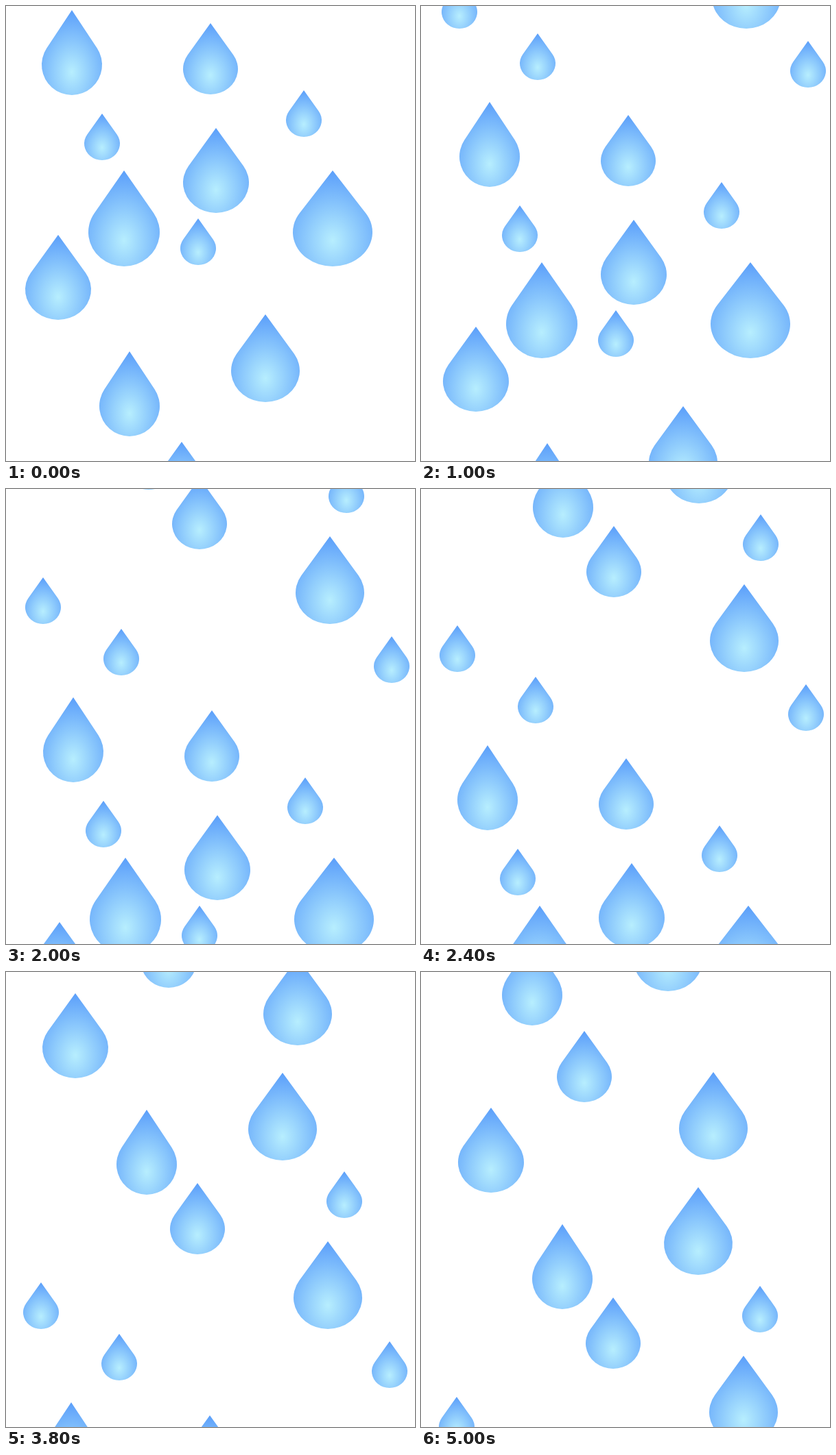
Animation of 596 by 664 pixels, one loop 5.2 s. Source, as an HTML page:

```html
<!DOCTYPE html>
<html lang="en">
<head>
<meta charset="utf-8">
<title>Falling raindrops</title>
<style>
  html, body { margin: 0; width: 100%; height: 100%; overflow: hidden; background: #fff; }
  svg { display: block; width: 100%; height: 100%; }

  /* Integer properties keep every pose on whole pixels. */
  @property --x { syntax: "<integer>"; inherits: false; initial-value: 0; }
  @property --y { syntax: "<integer>"; inherits: false; initial-value: 0; }

  #rain {
    transform: translate(calc(var(--x) * 1px), calc(var(--y) * 1px));
    animation: fall 5.2s infinite;
  }
  /* 26 poses of 200 ms each; percentages sit just below whole poses. */
  @keyframes fall {
    0%       { --x: 0;  --y: 0;   animation-timing-function: steps(5); }
    19.2307% { --x: 4;  --y: 134; animation-timing-function: steps(1); }
    23.0769% { --x: 6;  --y: 165; animation-timing-function: steps(2); }
    30.7692% { --x: 2;  --y: 228; animation-timing-function: steps(4); }
    46.1538% { --x: 1;  --y: 368; animation-timing-function: steps(3); }
    57.6923% { --x: 1;  --y: 425; animation-timing-function: steps(4); }
    73.0769% { --x: -1; --y: 622; animation-timing-function: steps(6); }
    96.1538%, 100% { --x: 0; --y: 789; }
  }
</style>
</head>
<body>
<svg viewBox="0 0 596 664">
  <defs>
    <radialGradient id="water" cx=".5" cy=".73" r=".75">
      <stop offset="0" stop-color="#b7eefe"/>
      <stop offset="1" stop-color="#589cfa"/>
    </radialGradient>
    <!-- Unit drop: tip at the origin, 100 wide, 100 high -->
    <path id="drop" d="M0 0 41.7 44.7A50 35.6 0 1 1-41.7 44.7Z" fill="url(#water)"/>
  </defs>
  <g id="rain"></g>
</svg>
<script>
  const rain = document.getElementById('rain');

  // x, y: tip of the drop at the start of the loop
  function addDrop(w, h, x, y) {
    const drop = document.createElementNS(rain.namespaceURI, 'use');
    drop.setAttribute('href', '#drop');
    drop.setAttribute('transform', `translate(${x} ${y}) scale(${w / 100} ${h / 100})`);
    rain.append(drop);
  }

  const addSmall = (x, y) => addDrop(52, 68, x, y);
  const addMedium = (x, y) => addDrop(80, 104, x, y);

  // The same cluster of large drops comes down three times.
  function addCluster(x, y) {
    addDrop(96, 124, x - 104, y - 170);
    addDrop(88, 124, x, y);
    addDrop(100, 128, x + 198, y - 54);
    addDrop(100, 128, x + 264, y + 192);
  }

  addCluster(180, 504);
  addCluster(206, -421);
  addCluster(162, -835);

  // Drops of the opening view
  addDrop(88, 124, 96, 6);
  addDrop(96, 124, 306, 178);
  addDrop(104, 140, 172, 240);
  addDrop(116, 140, 476, 240);
  addMedium(298, 25);
  addMedium(256, 636);
  addSmall(434, 123);
  addSmall(140, 157);
  addSmall(280, 310);

  // Drops that follow between the clusters
  addSmall(560, -83);
  addSmall(166, -94);
  addSmall(52, -169);
  addSmall(494, -331);
  addMedium(280, -314);
  addMedium(238, -703);
</script>
</body>
</html>
```
